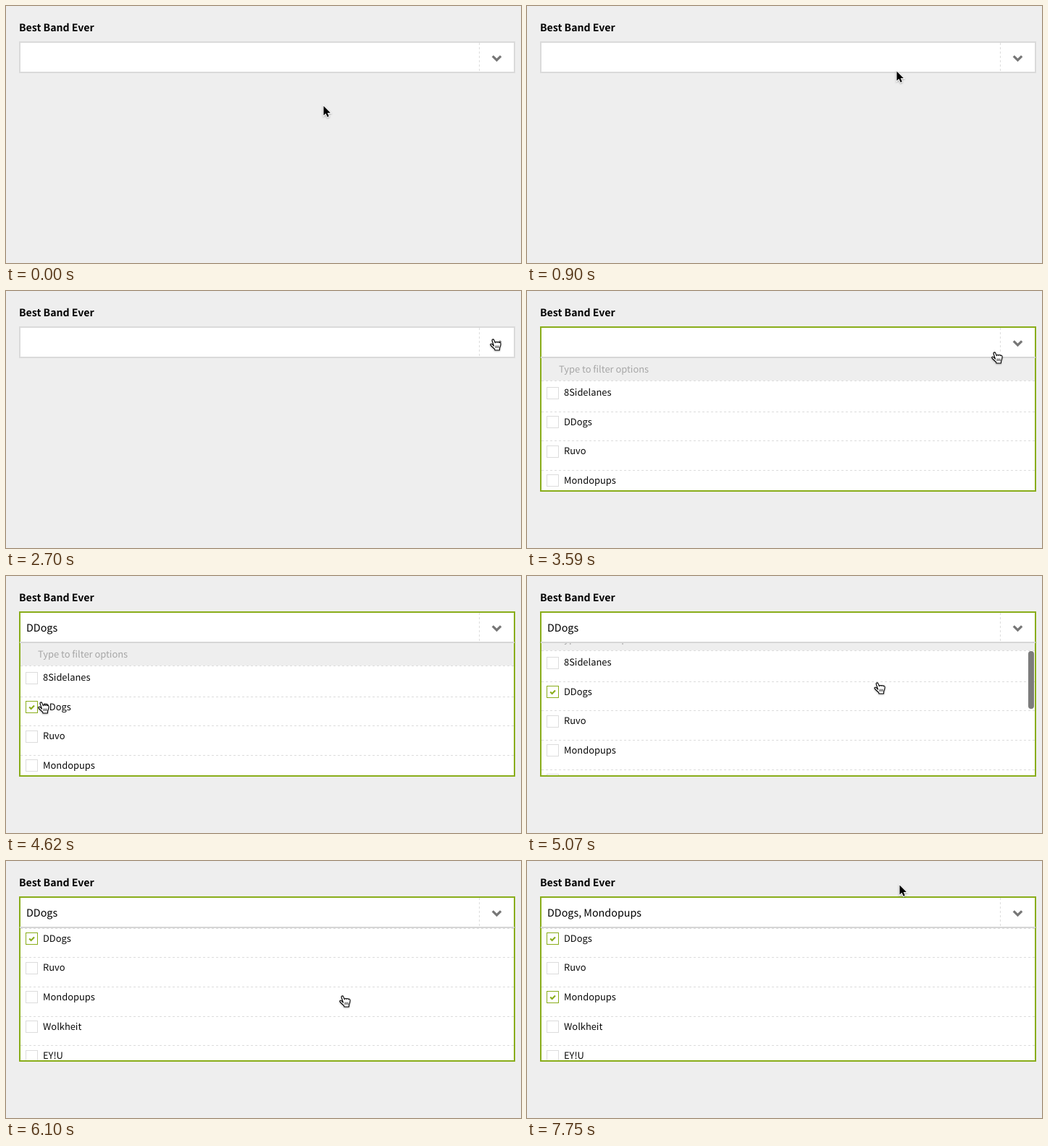
Write an HTML page that moves like this. It is 711x356 px and loops after 8000 ms.

```html
<!DOCTYPE html>
<html lang="en">
<head>
<meta charset="utf-8">
<title>Multi-select dropdown</title>
<style>
  html, body { margin: 0; width: 100%; height: 100%; overflow: hidden; background: #eee; }
  svg { display: block; }
  text {
    font-family: "Noto Sans CJK JP", "Noto Sans CJK SC", "Noto Sans CJK", "Open Sans", sans-serif;
    font-size: 12.9px; fill: #0a0a0a; text-rendering: geometricPrecision;
  }
  #label { font-size: 14.1px; font-weight: 700; fill: #000; }
  #value { font-size: 14.32px; fill: #000; }
  #hint { fill: #a6a6a6; }
  .dash { stroke: #dcdcdc; stroke-dasharray: 3 3; fill: none; }
  .tick { stroke: #89ad1a; stroke-width: 2.1; fill: none; }
  .cursor { filter: drop-shadow(0 1px 1px rgba(0, 0, 0, .3)); }
</style>
</head>
<body>
<svg width="711" height="356" viewBox="0 0 711 356">
  <defs><clipPath id="view"><rect x="20" y="93" width="681" height="183"/></clipPath></defs>
  <text id="label" x="18" y="35">Best Band Ever</text>

  <rect x="19" y="50" width="683" height="42" fill="#fff" stroke="#dadada" stroke-width="2"/>

  <g id="panel">
    <rect x="19" y="50" width="683" height="227" fill="#fff" stroke="#89ad1a" stroke-width="2"/>
    <g clip-path="url(#view)">
      <g id="list">
        <rect x="20" y="93" width="681" height="31" fill="#eee"/>
        <path class="dash" d="M20 124.5H701"/>
        <text id="hint" x="44" y="113">Type to filter options</text>
      </g>
      <rect id="bar" x="692" width="8" height="80" rx="4" fill="#7c7c7c"/>
    </g>
    <path d="M19 92H702" stroke="#d6d6d6" stroke-width="2"/>
  </g>

  <path class="dash" d="M653.5 51V91"/>
  <path d="M671.8 69.3L677.5 75L683.2 69.3" fill="none" stroke="#777" stroke-width="3.2"/>
  <text id="value" x="28" y="77"></text>

  <g id="arrow" class="cursor">
    <path d="M.5 .5V13.6L3.5 10.8L5.7 15.7L7.8 14.8L5.7 10H9.9Z" fill="#000" stroke="#fff" stroke-width="1.8" paint-order="stroke"/>
  </g>
  <g id="hand" class="cursor">
    <path d="M5.5 10.2L3.2 2.8C2.7 1 4.9 .2 5.7 1.9L7.4 5.8C7.5 4.3 9.6 4 10 5.4C10.4 4.2 12.2 4.2 12.6 5.6C13.2 4.8 14.9 5.2 15 6.6C15.3 9 14.6 11 13.6 13L13.4 16H7L6.6 14.4C5 12.8 2.4 11 1 8.9C.2 7.4 2.2 6.6 3.4 7.8Z"
      fill="#fff" stroke="#000" stroke-width="1.1" stroke-linejoin="round"/>
    <path d="M8 9.6V13M10 9.6V13M12 9.6V13" stroke="#000" stroke-width=".8"/>
  </g>
</svg>
<script>
const LOOP = 8000, PITCH = 40.6;
const OPTIONS = ["8Sidelanes", "DDogs", "Ruvo", "Mondopups", "Wolkheit", "EY!U"];

// Each row: start time, then the values held until the next row.
const POINTER = [
  [0, "arrow", 438, 138], [450, "arrow", 444, 135], [600, "arrow", 473, 117],
  [750, "arrow", 504, 94], [900, "arrow", 510, 90],
  [1200, "arrow", 514, 89], [1350, "hand", 545, 86], [1500, "hand", 608, 81],
  [1650, "hand", 655, 79], [1800, "hand", 668, 79],
  [2550, "hand", 668, 72], [2700, "hand", 668, 66],
  [3440, "hand", 664, 71], [3590, "hand", 641, 84], [3740, "hand", 400, 130],
  [3890, "hand", 130, 165], [4030, "hand", 44, 174],
  [4920, "hand", 310, 157], [5070, "hand", 479, 147], [5220, "hand", 481, 147],
  [5660, "hand", 479, 151], [5810, "hand", 471, 166], [5960, "hand", 463, 181],
  [6100, "hand", 460, 186],
  [7300, "hand", 464, 176], [7450, "hand", 482, 125], [7600, "hand", 503, 62],
  [7750, "arrow", 514, 33]
];
const SCROLL = [[0, 0], [5070, 21], [5220, 58], [5370, 74]];
const BAR = [[0, 0], [5070, 1], [5810, .6], [5960, .25], [6100, 0]];
const FIRST = [[0, 0], [4480, .5], [4620, 1]];
const SECOND = [[0, 0], [6700, 1]];
const OPEN_AT = 2990;

const $ = id => document.getElementById(id);
const held = (table, t) => table.findLast(row => row[0] <= t);
const rowY = (base, i) => Math.floor(base + i * PITCH);

function add(parent, tag, attrs, text = "") {
  const el = document.createElementNS("http://www.w3.org/2000/svg", tag);
  for (const key in attrs) el.setAttribute(key, attrs[key]);
  el.textContent = text;
  return parent.appendChild(el);
}

const checks = OPTIONS.map((name, i) => {
  const list = $("list"), y = rowY(133, i);
  const box = { x: 27.5, y: y + .5, width: 16, height: 16, fill: "#fff" };
  add(list, "path", { class: "dash", d: `M20 ${rowY(167.3, i) + .5}H701` });
  add(list, "rect", { ...box, stroke: "#dcdcdc" });
  add(list, "text", { x: 51, y: rowY(145.6, i) }, name);
  const mark = add(list, "g", { opacity: 0 });
  add(mark, "rect", { ...box, stroke: "#89ad1a" });
  add(mark, "path", { class: "tick", d: `M32.2 ${y + 8.6}l2.4 2.4l4.4 -4.4` });
  return mark;
});

function draw(t) {
  const [, kind, x, y] = held(POINTER, t);
  for (const id of ["arrow", "hand"]) {
    $(id).setAttribute("visibility", id === kind ? "visible" : "hidden");
    $(id).setAttribute("transform", `translate(${x} ${y})`);
  }

  const scroll = held(SCROLL, t)[1];
  $("panel").setAttribute("visibility", t >= OPEN_AT ? "visible" : "hidden");
  $("list").setAttribute("transform", `translate(0 ${-scroll})`);
  $("bar").setAttribute("y", Math.round(95 + scroll * .437));
  $("bar").setAttribute("opacity", held(BAR, t)[1]);

  const first = held(FIRST, t)[1], second = held(SECOND, t)[1];
  checks[1].setAttribute("opacity", first);
  checks[3].setAttribute("opacity", second);
  $("value").textContent = [first && OPTIONS[1], second && OPTIONS[3]].filter(Boolean).join(", ");
}

const start = performance.now();
function tick() {
  draw((performance.now() - start) % LOOP);
  requestAnimationFrame(tick);
}
tick();
</script>
</body>
</html>
```
